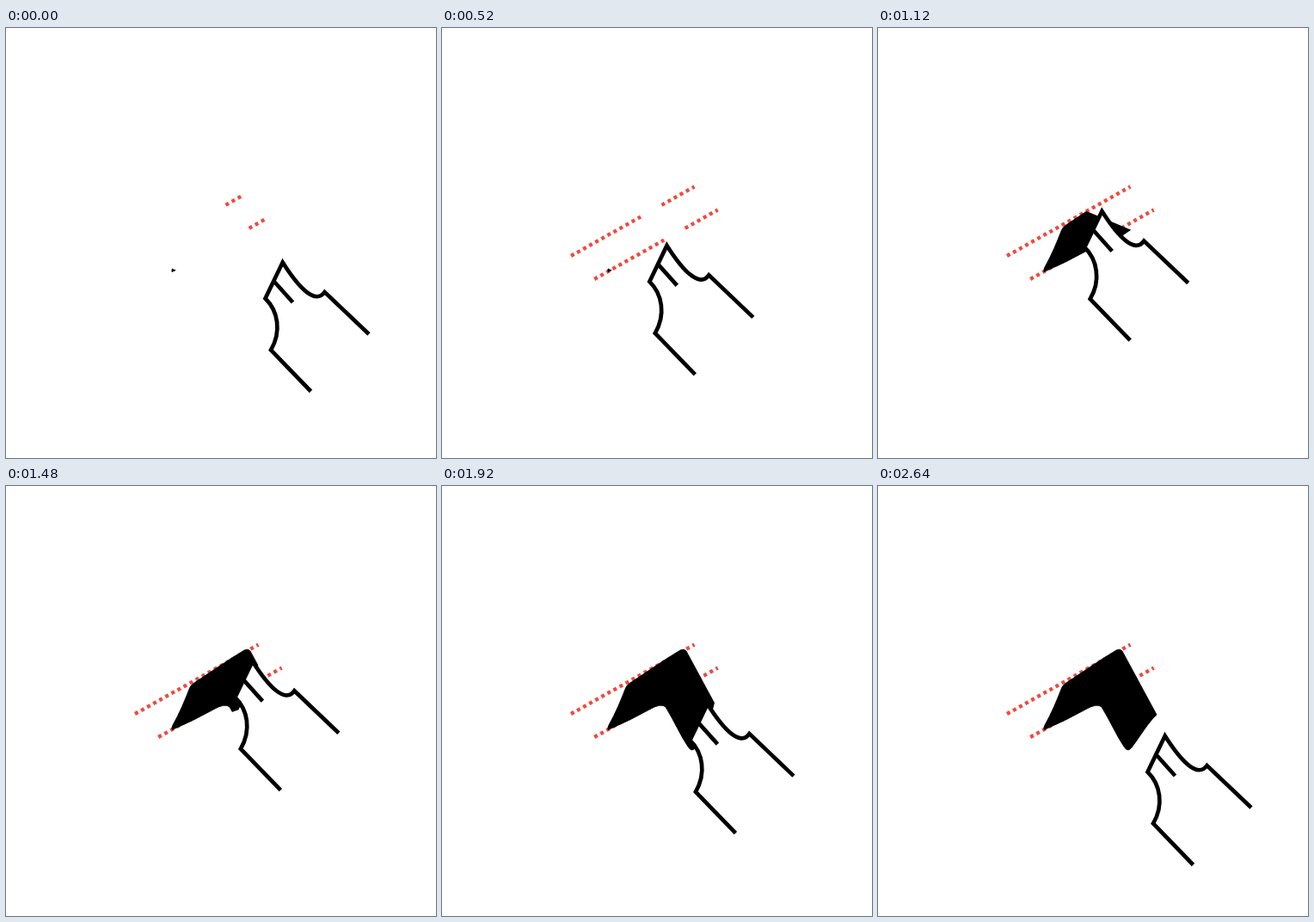
An HTML page that plays this animation: 500x500 px, repeating every 3.08 s.

```html
<!DOCTYPE html>
<html lang="en">
<head>
<meta charset="utf-8">
<title>Drawing an arrow</title>
<style>
  html, body { margin: 0; width: 100%; height: 100%; overflow: hidden; background: #fff; }
  svg { display: block; width: 100vw; height: 100vh; }
</style>
</head>
<body>
<svg viewBox="0 0 500 500">
  <clipPath id="reveal"><polygon id="front"/></clipPath>
  <path id="guides" fill="none" stroke="#ee4b40" stroke-width="4.3" stroke-dasharray="4.1 4"/>
  <g clip-path="url(#reveal)">
    <path stroke="#000" stroke-width=".9" d="M193 283.500 Q192.500 281 194 278 C202 264 208 249 213.500 235
      Q215 231.500 218 229.500 L248 209.500 Q262 200 277 191 Q281.500 188.500 284 192 L324 266
      C314 275 305 291 295 304 Q291 309.500 287 304.500 C277 290 270 273 260 257
      Q255 252 241 260 Q218 273 193 283.500Z"/>
  </g>
  <g id="hand" fill="none" stroke="#000" stroke-width="4.7" stroke-miterlimit="10">
    <path fill="#fff" d="M354.500 422.500 L308 374.500 C320.500 353 316.500 329 301.500 314.500
      L321.700 272.500 C341 303 360 322 370.500 307 L422 356"/>
    <path d="M312 295 L333.500 319"/>
  </g>
</svg>
<script>
const LOOP = 3080, STEP = 40;
const RISE = 760, PEAK = 1360, DONE = 2160;
const REST = [0, 0], TAIL = [-106, -34.5], TOP = [-37, -73], END = [-6.5, -4], AWAY = [12, 18];
const $ = id => document.getElementById(id);

// Eased progress from time a to time b, between 0 and 1.
function ease(t, a, b) {
  const u = Math.min(1, Math.max(0, (t - a) / (b - a)));
  return u * u * (3 - 2 * u);
}

const mix = (p, q, u) => p.map((v, i) => v + (q[i] - v) * u);

function handAt(t) {
  if (t < RISE) return mix(REST, TAIL, ease(t, 280, 720));
  if (t < PEAK) return mix(TAIL, TOP, ease(t, RISE, PEAK));
  if (t < DONE) return mix(TOP, END, ease(t, PEAK, DONE));
  return mix(END, AWAY, ease(t, DONE, 2640));
}

// Ink grows from a speck to the top corner, then its edge follows the hand.
const SPECK = [188, 280, 192, 279, 199, 282.5, 192, 287, 189, 288];
const BARB = [206, 157, 262.5, 174, 346, 209, 335, 216.5, 252, 262];

function frontAt(t, [x, y]) {
  const edge = t < PEAK
    ? mix(SPECK, BARB, ease(t, RISE, PEAK))
    : [200, 180, 300, 180, x + 330.5, y + 269, x + 326.5, y + 285, x + 305.5, y + 329];
  return [185, 290, ...edge];
}

function dashes(from, to) {
  return [[150, 265], [177.2, 292]].map(([x, y]) => {
    const at = f => `${x + 143.5 * f} ${y - 80.5 * f}`;
    return `M${at(from)}L${at(to)}`;
  }).join('');
}

// The guides grow from a point near the right and wrap round to the left.
function guidesAt(t) {
  const from = 0.735, grown = 0.13 + t * 0.7 / 520, end = from + grown;
  if (grown >= 1) return dashes(0, 1);
  return end > 1 ? dashes(from, 1) + dashes(0, end - 1) : dashes(from, end);
}

function draw(t) {
  const hand = handAt(t);
  $('guides').setAttribute('d', guidesAt(t));
  $('front').setAttribute('points', frontAt(t, hand).join(' '));
  $('hand').setAttribute('transform', `translate(${hand})`);
}

const start = performance.now();
function tick() {
  const t = (performance.now() - start) % LOOP;
  draw(Math.floor(t / STEP) * STEP);
  requestAnimationFrame(tick);
}
tick();
</script>
</body>
</html>
```
